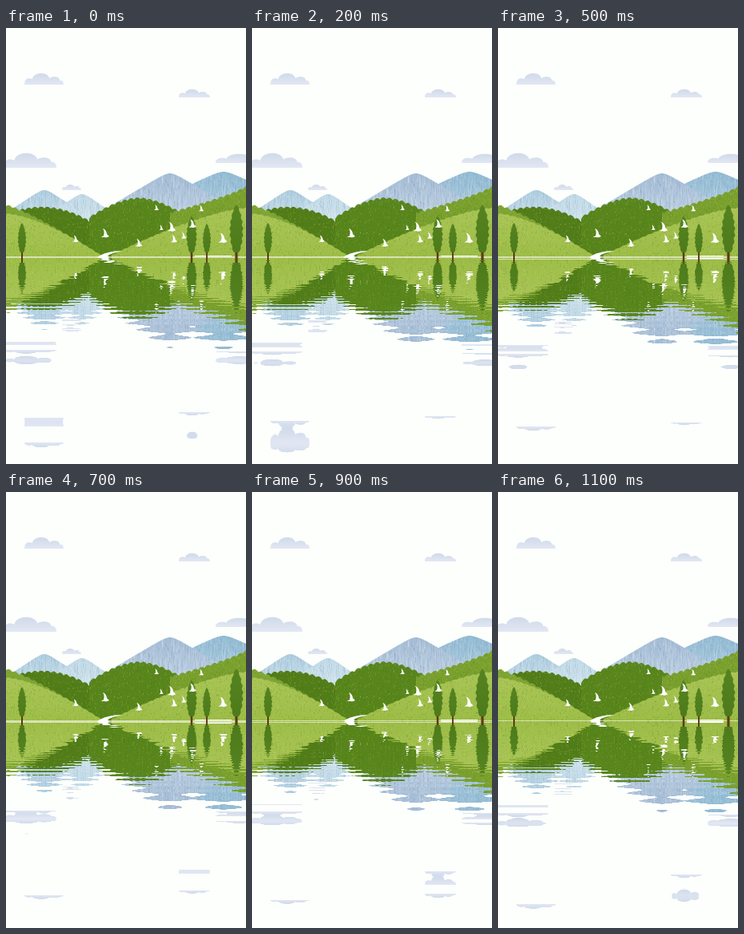
An HTML page with a canvas for the animation above (1.2 s loop, 300 px wide and 546 px high).

```html
<!DOCTYPE html>
<html lang="en">
<head>
<meta charset="utf-8">
<title>Lake reflection</title>
<style>
  html, body { margin: 0; width: 100%; height: 100%; overflow: hidden; background: #fdfffc; }
  canvas { display: block; }
</style>
</head>
<body>
<canvas id="stage" width="300" height="546"></canvas>
<script>
const W = 300, H = 546, SHORE = 287, STEPS = 12, STEP_MS = 100;
const stage = document.getElementById('stage').getContext('2d');
const scene = document.createElement('canvas');
scene.width = W;
scene.height = SHORE;
const g = scene.getContext('2d');

let seed = 7;
const random = () => (seed = (seed * 16807) % 2147483647) / 2147483647;

function fade(top, bottom, y0, y1) {
  const fill = g.createLinearGradient(0, y0, 0, y1);
  fill.addColorStop(0, top);
  fill.addColorStop(1, bottom);
  return fill;
}

// Land below the curve y(x), from x0 to x1, with painted grain of the given length.
function land(x0, x1, y, top, bottom, light, dark, grain) {
  const path = new Path2D();
  let high = SHORE;
  path.moveTo(x0, SHORE);
  for (let x = x0; x <= x1; x++) {
    path.lineTo(x, y(x));
    high = Math.min(high, y(x));
  }
  path.lineTo(x1, SHORE);
  g.save();
  g.clip(path);
  g.fillStyle = fade(top, bottom, high, SHORE);
  g.fillRect(x0, high, x1 - x0, SHORE - high);
  for (let i = (x1 - x0) * (SHORE - high) * 0.12; i > 0; i--) {
    g.fillStyle = random() < 0.5 ? light : dark;
    g.fillRect(x0 + random() * (x1 - x0) | 0, high + random() * (SHORE - high) | 0, 1, 1 + random() * grain | 0);
  }
  g.restore();
}

function hill(x0, x1, bump, ridge, top, bottom) {
  const y = x => ridge(x) - bump * Math.abs(Math.sin(x * Math.PI / 8));
  land(x0, x1, y, top, bottom, 'rgba(215,225,110,.16)', 'rgba(60,90,10,.14)', 2);
}

function mountain(px, py, reach, slope, top, bottom) {
  const y = x => py - 4 + Math.hypot((x - px) * slope, 4);
  land(Math.max(0, px - reach), Math.min(W, px + reach), y, top, bottom,
    'rgba(255,255,255,.13)', 'rgba(90,130,170,.1)', 12);
}

function cloud(x, y, w, h) {
  const path = new Path2D();
  path.addPath(new Path2D('M0 1C0 .5 .08 .3 .2 .5C.24-.17 .6-.17 .64 .42C.72 .2 .9 .25 .9 .6C.98 .6 1 .8 1 1Z'),
    new DOMMatrix([w, 0, 0, h, x, y]));
  g.fillStyle = fade('#d0daea', '#e2e7f3', y, y + h);
  g.fill(path);
}

function tree(x, top) {
  const bottom = 281, half = (bottom - top) / 7.5, rows = 14;
  g.fillStyle = '#5f3a18';
  g.fillRect(x - half * 0.2, bottom - 4, half * 0.4, SHORE - bottom + 4);
  g.beginPath();
  for (let i = -rows; i <= rows; i++) {
    const u = Math.abs(i) / rows;
    const width = half * Math.sin(Math.PI * 0.9 * u) ** 0.7 * (i % 2 ? 1.1 : 0.88);
    g.lineTo(x + Math.sign(i) * width, top + (bottom - top) * u);
  }
  g.fillStyle = fade('#568320', '#4d7b1b', top, bottom);
  g.fill();
}

function bird(x, y, size) {
  g.save();
  g.translate(x, y);
  g.scale(size, size);
  g.fillStyle = '#fff';
  g.fill(new Path2D('M-3-6C0-5 2-2 2 1L5 4C3 5 1 6-1 5L-5 5L-2 3C-1 0-1-3-3-6Z'));
  g.restore();
}

function paintScene() {
  g.fillStyle = '#fdfffc';
  g.fillRect(0, 0, W, SHORE);

  cloud(23, 57, 49, 14);
  cloud(216, 77, 39, 10);
  cloud(-3, 157, 66, 18);
  cloud(262, 158, 68, 11);
  cloud(70, 196, 24, 7);

  mountain(272, 180, 60, 0.48, '#8fb9d2', '#d9e9f2');
  mountain(205, 182, 75, 0.6, '#a3bbd4', '#dce8f2');
  mountain(48, 203, 50, 0.68, '#afcee0', '#e2eef5');
  mountain(95, 208, 40, 0.72, '#bfd9e6', '#e8f2f6');

  hill(18, 150, 2.5, x => 226 + 55 * ((x - 45) / 105) ** 2, '#527d19', '#507d19');
  hill(104, 240, 2.5, x => 214.5 + 22 * Math.abs((x - 166) / 58) ** 1.7, '#59861d', '#56841a');
  hill(205, W, 2.5, x => 200 + 33 * ((W - x) / 95) ** 0.8, '#7ba12f', '#769d2b');
  hill(0, 120, 2, x => 223 + 64 * (x / 120) ** 1.2, '#7ea534', '#84a936');
  hill(0, 120, 1, x => 233 + 53 * (x / 120) ** 1.5, '#a9c556', '#9dbd48');
  hill(132, W, 1, x => 226 + 59 * ((W - x) / 168) ** 1.4, '#a9c556', '#9bbb46');

  g.fillStyle = 'rgba(255,255,250,.6)';
  g.fillRect(0, SHORE - 1, W, 1);
  g.fillStyle = '#fff';
  g.fill(new Path2D('M146 279C132 279 121 282 114 287H129C124 284 134 282 146 279Z'));
  g.fillRect(236, SHORE - 2, 46, 1);

  for (const [x, top] of [[20, 244], [232, 235], [251, 245], [288, 221]]) tree(x, top);

  // Nearest bird first, each following one a little smaller.
  [[271, 263], [207, 249], [124, 257], [233, 245], [166, 269], [210, 264],
   [87, 264], [222, 260], [244, 226], [188, 225], [194, 250]]
    .forEach(([x, y], i) => bird(x, y, 1.1 - 0.055 * i));
}

// Each water row copies a mirrored row shifted by a ripple that widens toward the viewer.
function drawWater(step) {
  const phase = 2 * Math.PI * (step - 1) / STEPS, waves = Math.floor(SHORE / 14);
  for (let n = 0; n < H - SHORE; n++) {
    const ripple = Math.sin(waves * (SHORE - n) / (n + 1) + phase);
    const shift = Math.trunc(waves * (n + 28) / SHORE * ripple);
    const row = n + shift < 0 ? n : n + shift;
    stage.drawImage(scene, 0, SHORE - 1 - row, W, 1, 0, SHORE + n, W, 1);
  }
}

function tick(now) {
  drawWater(Math.floor(now / STEP_MS) % STEPS);
  requestAnimationFrame(tick);
}

paintScene();
stage.drawImage(scene, 0, 0);
drawWater(0);
requestAnimationFrame(tick);
</script>
</body>
</html>
```
